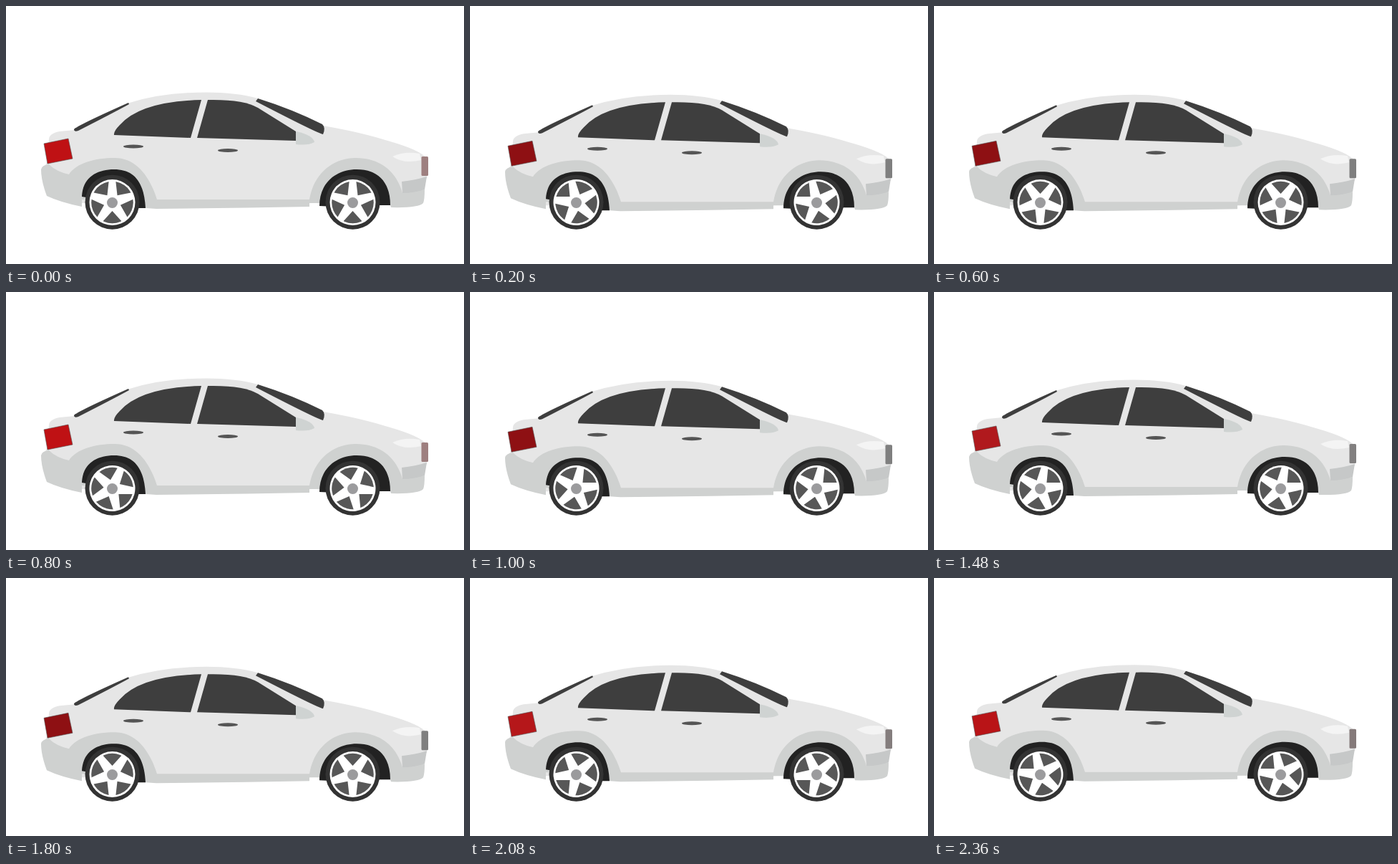
An HTML page that plays this animation: 640x360 px, repeating every 2400 ms.

```html
<!DOCTYPE html>
<html lang="en">
<head>
<meta charset="utf-8">
<title>Car</title>
<style>
html, body { margin: 0; width: 100%; height: 100%; overflow: hidden; background: #fff; }
svg { display: block; width: 640px; height: 360px; }
</style>
</head>
<body>
<svg viewBox="0 0 640 360">
  <defs>
    <g id="rim">
      <circle r="32" fill="#fff"/>
      <circle r="29.3" fill="#575757"/>
      <path id="star" fill="#fff"/>
    </g>
  </defs>
  <g id="body">
    <path fill="#e6e6e6" d="M60 186Q60 178 75 175L96 173Q98 167 171 135.500Q218 120.500 280 120.500Q322 120.500 352 129Q400 144 443 167Q495 176 530 187Q566 197 580 206L590 213L588 240L560 270L424 275L106 275L52 226Q62 215 58 205Z"/>
    <path fill="#cfd1d0" d="M49 228Q50 222 60 221Q70 231 88 235C98 219 125 212 152 212C182 212 201 238 211 270H424C430 233 458 212 488 212C524 212 546 232 554 261L585 256Q585 270 583 275Q576 282 538 281L536 275H424V280Q310 282 210 283L196 282L150 270L106 270V280Q76 274 57 265Q49 244 49 228Z"/>
    <path fill="#c6c8c8" d="M553 245Q572 243 588 238L585 256Q570 261 554 261Z"/>
    <path fill="#222" d="M106 266C107 240 126 228 151 228C178 228 193 244 195 282H150L112 267Z"/>
    <path fill="#222" d="M438 279C438 246 462 228 490 228C520 228 537 246 537 278H522L484 281Z"/>
    <g fill="#3e3e3e">
      <path d="M95 172Q99 167 171 135L172 137Q150 149 101 174Q95 176 95 172Z"/>
      <path d="M151 180Q150 175 159 166Q188 133 273 131L258 184Z"/>
      <path d="M282 131Q332 130 352 142L405 175V188L267 184Z"/>
      <path d="M352 129Q400 144 442 165Q447 170 443 179Q436 178 349 133Z"/>
    </g>
    <path fill="#cfd3d2" d="M405 175Q429 180 431 190Q422 195 405 193Z"/>
    <g fill="#555">
      <ellipse cx="178" cy="196" rx="14" ry="2.500"/>
      <ellipse cx="310" cy="201.500" rx="14" ry="2.500"/>
    </g>
    <path fill="#f4f4f4" d="M540 210Q557 202 578 206L580 215Q556 221 540 210Z"/>
    <path id="lamp" d="M53 192L87 185L93 213L58 220Z" stroke="#555" stroke-width=".6"/>
    <rect id="front" x="580.500" y="210" width="9.500" height="27" rx="1.500"/>
  </g>
  <g id="wheels"></g>
</svg>
<script>
const LOOP = 2400, BOUNCE = 400, STEP = 40, DROP = 3.3, TURNS = 2;
const $ = id => document.getElementById(id);

// Colours from the top of the bounce to the bottom.
const LEVELS = [0, .2, .6, 1];
const LAMP = [[191, 17, 20], [185, 20, 23], [176, 25, 29], [142, 16, 19]];
const FRONT = [[158, 127, 127], [133, 122, 122], [130, 128, 128], [127, 127, 127]];

function shade(stops, x) {
  const i = x < LEVELS[1] ? 0 : x < LEVELS[2] ? 1 : 2;
  const k = (x - LEVELS[i]) / (LEVELS[i + 1] - LEVELS[i]);
  return `rgb(${stops[i].map((c, j) => Math.round(c + (stops[i + 1][j] - c) * k))})`;
}

const polar = (r, deg) => {
  const a = deg * Math.PI / 180;
  return `${(r * Math.sin(a)).toFixed(2)} ${(-r * Math.cos(a)).toFixed(2)}`;
};
$('star').setAttribute('d', 'M' + [0, 72, 144, 216, 288].map(a =>
  `${polar(30.5, a - 9)}L${polar(30.5, a + 9)}L${polar(12, a + 36)}`).join('L') + 'Z');

$('wheels').innerHTML = [148.5, 484.5].map(x => `
  <g transform="translate(${x} 274)">
    <circle r="38" cy="-.3" fill="#333"/>
    <use href="#rim" class="spin"/>
    <circle r="7.500" cy=".5" fill="#9b9b9d"/>
  </g>`).join('');
const rims = document.querySelectorAll('.spin');

function draw(now) {
  const t = Math.floor(now % LOOP / STEP + 1e-6) * STEP;
  const p = t % BOUNCE / BOUNCE;
  const low = 1 - Math.abs(1 - 2 * p);
  $('body').setAttribute('transform', `translate(0 ${(low * DROP).toFixed(2)})`);
  $('lamp').setAttribute('fill', shade(LAMP, low));
  $('front').setAttribute('fill', shade(FRONT, low));
  rims.forEach(r => r.setAttribute('transform', `rotate(${360 * TURNS * t / LOOP})`));
}

const start = performance.now();
function tick() {
  draw(performance.now() - start);
  requestAnimationFrame(tick);
}
draw(0);
requestAnimationFrame(tick);
</script>
</body>
</html>
```
